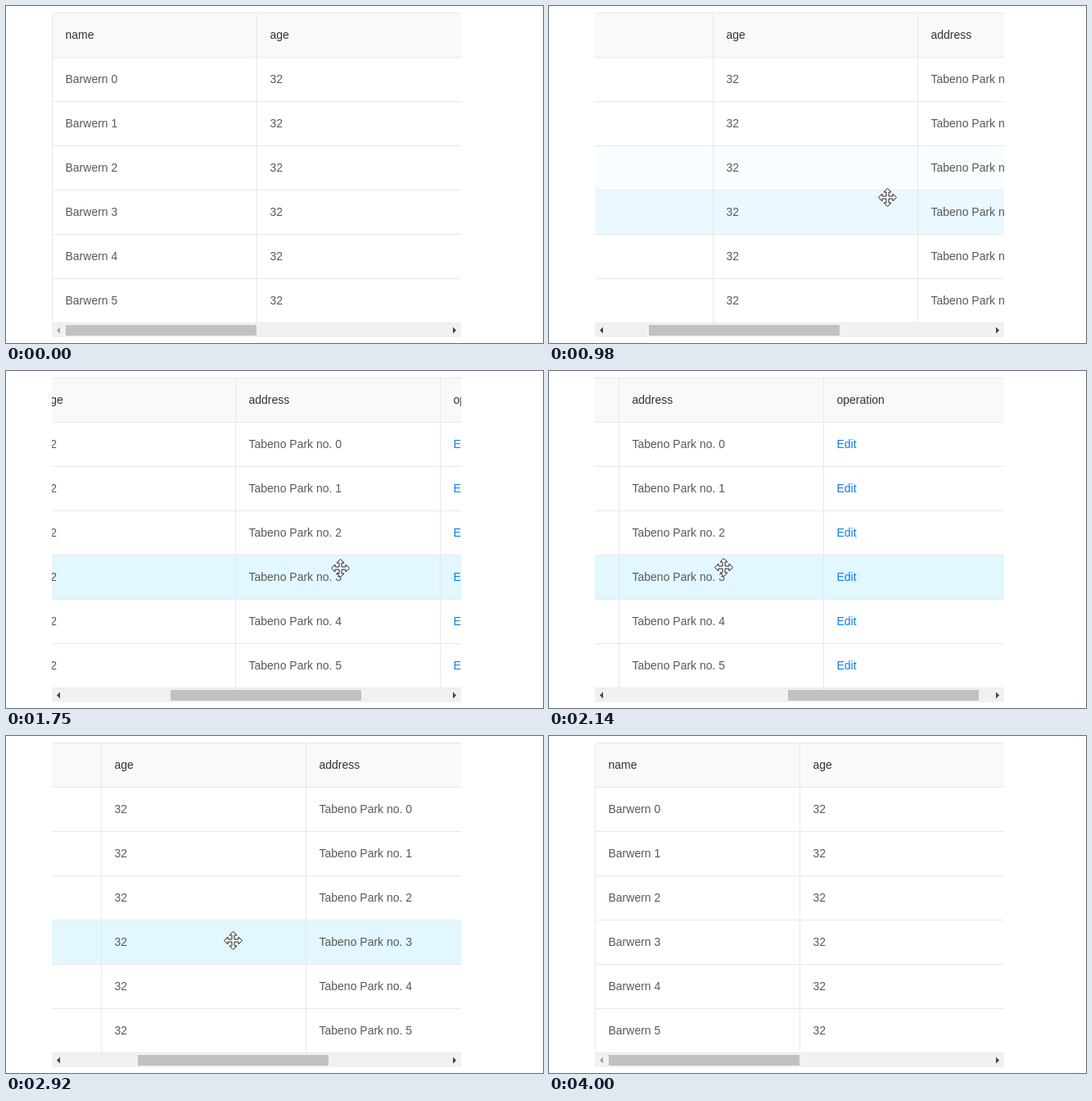
These frames come from a looping animation (656 px wide and 411 px high, 4.78 s). An HTML page:

```html
<!DOCTYPE html>
<html lang="en">
<head>
<meta charset="utf-8">
<title>Drag to scroll table</title>
<style>
html, body { margin: 0; width: 100%; height: 100%; overflow: hidden; background: #fff; }
body { position: relative; font: 14px/21px "Liberation Sans", Arial, sans-serif; color: #595959; }
#view { position: absolute; left: 56px; top: 8px; width: 500px; height: 379px; overflow: hidden; }
#table { position: absolute; box-sizing: border-box; width: 1001px; border: solid #e8e8e8;
  border-width: 1px 0 0 1px; border-radius: 4px 4px 0 0; overflow: hidden; }
.row { display: flex; }
.row div { box-sizing: border-box; width: 250px; height: 54px; padding: 16px 15.5px;
  border: solid #e8e8e8; border-width: 0 1px 1px 0; white-space: nowrap; }
.row:first-child { background: #f9f9f9; color: #333; }
.row:not(:first-child) div:last-child { color: #0a7df2; }
#bar { position: absolute; left: 56px; top: 387px; width: 500px; height: 17px; background: #f1f1f1; }
#thumb { position: absolute; left: 17px; top: 2px; width: 233px; height: 13px; background: #c1c1c1; }
#bar svg { position: absolute; left: 0; top: 0; }
#cursor { position: absolute; left: -12px; top: -12px; }
</style>
</head>
<body>
<div id="view"><div id="table"></div></div>
<div id="bar">
  <div id="thumb"></div>
  <svg width="500" height="17">
    <path id="prev" d="M6 8.5l4-4v8z"/>
    <path id="next" d="M494 8.5l-4-4v8z"/>
  </svg>
</div>
<svg id="cursor" width="25" height="25" viewBox="-12.5 -12.5 25 25">
  <path fill="#fff" stroke="#222" d="M0-11L4.5-6.5H1.5V-1.5H6.5V-4.5L11 0L6.5 4.5V1.5H1.5V6.5H4.5L0 11L-4.5 6.5H-1.5V1.5H-6.5V4.5L-11 0L-6.5-4.5V-1.5H-1.5V-6.5H-4.5Z"/>
</svg>
<script>
const $ = id => document.getElementById(id);
const LOOP = 4780, START = 50, STEP = 77, MAX_SCROLL = 501;

const lines = [["name", "age", "address", "operation"]];
for (let i = 0; i < 6; i++) lines.push(["Barwern " + i, "32", "Tabeno Park no. " + i, "Edit"]);
$("table").innerHTML = lines.map(cells =>
  `<div class="row">${cells.map(c => `<div>${c}</div>`).join("")}</div>`).join("");
const rows = [...document.querySelectorAll(".row")].slice(1);

// Pointer stops; "drag" marks a move that pulls the table along.
const stops = [
  { at: 0, x: 405, y: 340 },
  { at: 8, x: 388, y: 211 },
  { at: 10, x: 519, y: 222 },
  { at: 17, x: 303, y: 244, drag: true },
  { at: 21, x: 468, y: 240 },
  { at: 30, x: 181, y: 239, drag: true },
  { at: 31, x: 241, y: 241 },
  { at: 35, x: 552, y: 242, drag: true },
  { at: 38, x: 140, y: 252 },
  { at: 42, x: 338, y: 282, drag: true },
  { at: 48, x: 583, y: 312 },
  { at: 51, x: 655, y: 410 }
];
const END = stops.at(-1).at;

// Drags slow down towards their end; free moves are even.
function pose(step) {
  let { x, y } = stops[0], scroll = 0;
  for (let i = 1; i < stops.length && stops[i - 1].at < step; i++) {
    const a = stops[i - 1], b = stops[i];
    const u = Math.min(1, (step - a.at) / (b.at - a.at));
    const p = b.drag ? 1 - (1 - u) ** 2 : u;
    x = a.x + (b.x - a.x) * p;
    y = a.y + (b.y - a.y) * p;
    if (b.drag) scroll = Math.max(0, Math.min(MAX_SCROLL, scroll + a.x - x));
  }
  return [x, y, scroll].map(Math.round);
}

function hoveredRow(step) {
  const [x, y] = pose(step);
  return x < 556 && step < END ? Math.floor((y - 66) / 54) : -1;
}

function draw(now) {
  const step = Math.min(END, Math.floor((now % LOOP - START) / STEP));
  const [x, y, scroll] = pose(step);

  // Each row fades halfway to its hover state per step.
  const glow = rows.map(() => 0);
  for (let s = 0; s <= step; s++) {
    const over = hoveredRow(s);
    glow.forEach((g, i) => glow[i] += ((i === over) - g) / 2);
  }
  rows.forEach((row, i) => row.style.background = `rgba(226,247,255,${glow[i].toFixed(3)})`);

  $("table").style.left = -scroll + "px";
  $("thumb").style.left = 17 + Math.floor(scroll * .466) + "px";
  $("prev").style.fill = scroll > 0 ? "#444" : "#a3a3a3";
  $("next").style.fill = scroll < MAX_SCROLL ? "#444" : "#a3a3a3";
  $("cursor").style.transform = `translate(${x}px,${y}px)`;
  $("cursor").style.visibility = step >= 0 && step < END ? "visible" : "hidden";
  requestAnimationFrame(draw);
}
requestAnimationFrame(draw);
</script>
</body>
</html>
```
